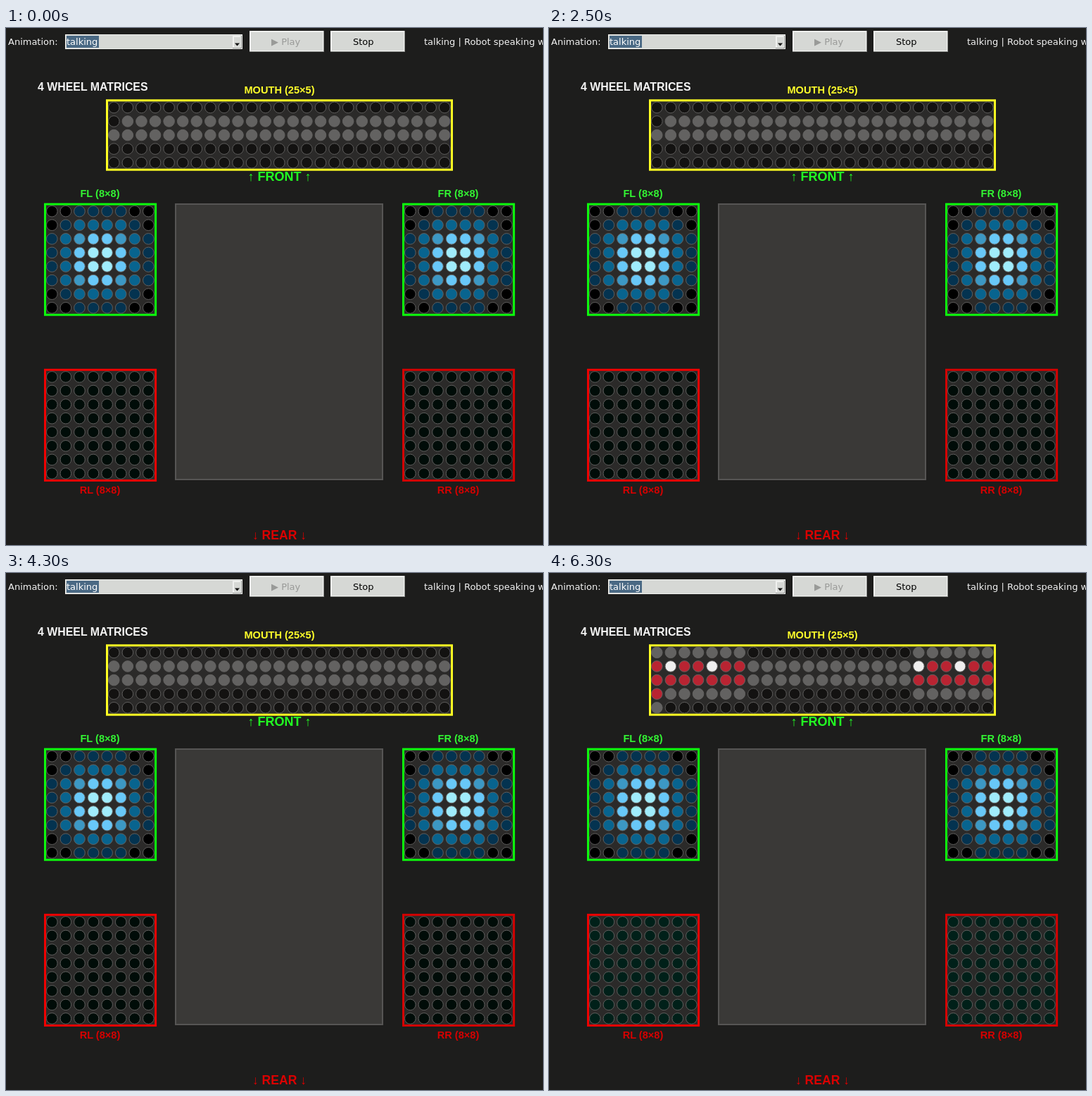
Recreate the animation shown at these times as an HTML page. Size 763 px wide and 734 px high, loop 6400 ms.

```html
<!DOCTYPE html>
<html lang="en">
<head>
<meta charset="utf-8">
<title>Wheel matrices</title>
<style>
html, body { margin: 0; width: 100%; height: 100%; overflow: hidden; background: #1d1d1c; }
svg { display: block; }
.ui { font: 13px "DejaVu Sans", sans-serif; }
.b { font-family: "Liberation Sans", Arial, sans-serif; font-weight: bold; text-anchor: middle; }
</style>
</head>
<body>
<svg id="stage" width="763" height="734" viewBox="0 0 763 734"></svg>
<script>
const stage = document.getElementById("stage");
const LOOP = 6400, STEP = 100, PITCH = 19.58;
const OFF = "#131211", LIP = "#636261", RED = "#b92432", TOOTH = "#efeeee";

function add(tag, attrs, text) {
  const el = document.createElementNS("http://www.w3.org/2000/svg", tag);
  for (const k in attrs) el.setAttribute(k, attrs[k]);
  if (text) el.textContent = text;
  stage.appendChild(el);
  return el;
}
const rect = (x, y, width, height, fill, more) => add("rect", { x, y, width, height, fill, ...more });
const ui = (x, y, text, fill) => add("text", { x, y, fill, class: "ui" }, text);
const bold = (x, y, size, fill, text, more) =>
  add("text", { x, y, fill, class: "b", "font-size": size, ...more }, text);

function bevel(x, y, w, h) {
  rect(x, y, w, h, "#8e908d");
  rect(x, y, w - 1, h - 1, "#f0f1ef");
  rect(x + 2, y + 2, w - 4, h - 4, "#d6d8d5");
}

// Framed grid of round lights; returns them row by row
function matrix(x, y, cols, rows, frame) {
  rect(x + 1.5, y + 1.5, cols * PITCH + 0.5, rows * PITCH + 0.5, "#2b2a29",
    { stroke: frame, "stroke-width": 3 });
  const dots = [];
  for (let r = 0; r < rows; r++)
    for (let c = 0; c < cols; c++)
      dots.push(add("circle", {
        cx: x + 11.3 + c * PITCH, cy: y + 11.6 + r * PITCH, r: 7.8,
        fill: OFF, stroke: "#666564", "stroke-width": 0.9
      }));
  return dots;
}

function toolbar() {
  ui(3, 23.5, "Animation:", "#f2f2f2");
  rect(84, 9, 252, 21, "#f0f1ef");
  rect(85, 10, 250, 19, "#d6d8d5");
  rect(86, 11, 46, 17, "#4a6984");
  ui(86, 23.5, "talking", "#ffffff");
  bevel(322, 11, 13, 18);
  add("path", { d: "M325 21.5h7l-3.5 4z", fill: "#111" });
  bevel(346, 4, 106, 30);
  ui(377, 23.5, "▶ Play", "#999a98");
  bevel(461, 4, 106, 30);
  ui(493, 23.5, "Stop", "#000000");
  ui(594, 23.5, "talking | Robot speaking w", "#f2f2f2");
}

function glow(d) {
  if (d < 1) return "#a0ecfc";
  if (d < 2) return "#68c8f8";
  if (d < 2.3) return "#3c98c4";
  if (d < 3) return "#08648f";
  if (d < 4) return "#043350";
  return "#000000";
}

toolbar();
bold(45, 89, 15.9, "#f4f4f4", "4 WHEEL MATRICES", { style: "text-anchor:start" });
bold(388.5, 93, 14.6, "#ffff2a", "MOUTH (25×5)");
rect(241, 250, 294, 391, "#3a3937", { stroke: "#565554", "stroke-width": 2 });
const mouth = matrix(142, 101.3, 25, 5, "#ffff22");
bold(388.5, 217.3, 18, "#22ff22", "↑ FRONT ↑");
bold(388.5, 726, 17.6, "#da0000", "↓ REAR ↓");

const rear = [];
for (const [side, x] of [["L", 54], ["R", 563]]) {
  bold(x + 79.5, 240, 14.6, "#33f533", `F${side} (8×8)`);
  bold(x + 79.5, 661, 14.6, "#d60000", `R${side} (8×8)`);
  matrix(x, 248.6, 8, 8, "#0cfa0c").forEach((dot, i) =>
    dot.setAttribute("fill", glow(Math.hypot(i % 8 - 3.5, (i >> 3) - 3.5))));
  rear.push(...matrix(x, 483.8, 8, 8, side === "L" ? "#f00000" : "#d40000"));
}

// Lip profiles along the mouth, a in radians
const wave = a => Math.abs(Math.sin(a));
const ends = a => 1 + Math.cos(a);
const flat = () => 1;
const SHAPES = [wave, ends, wave, ends, wave, ends, flat, ends];

// Loudness of the current syllable, 0 when silent
function loudness(t) {
  const p = t % 1100;
  return p > 400 && p < 850 ? Math.cos(Math.PI * (p - 600) / 800) : 0;
}

function mouthColor(row, col, h) {
  const top = Math.max(0, Math.trunc(2 - h));
  const bottom = Math.min(4, Math.trunc(2 + h));
  if (row < top || row > bottom) return OFF;
  if (row === top || row === bottom) return LIP;
  return row === 1 && col % 3 === 1 ? TOOTH : RED;
}

function draw(ms) {
  const t = Math.floor(ms % LOOP / STEP) * STEP;
  const v = loudness(t);
  const open = v > 0 ? 0.5 + 0.72 * v : 0.45;
  const shape = SHAPES[Math.floor(t / 850)];
  mouth.forEach((dot, i) => {
    const col = i % 25, row = Math.floor(i / 25);
    dot.setAttribute("fill", mouthColor(row, col, open * shape(col / 25 * 2 * Math.PI)));
  });
  const teal = `rgb(0,${Math.round(12 + 28 * v)},${Math.round(8 + 24 * v)})`;
  for (const dot of rear) dot.setAttribute("fill", teal);
}

const start = performance.now();
function tick() {
  draw(performance.now() - start);
  requestAnimationFrame(tick);
}
draw(0);
requestAnimationFrame(tick);
</script>
</body>
</html>
```
